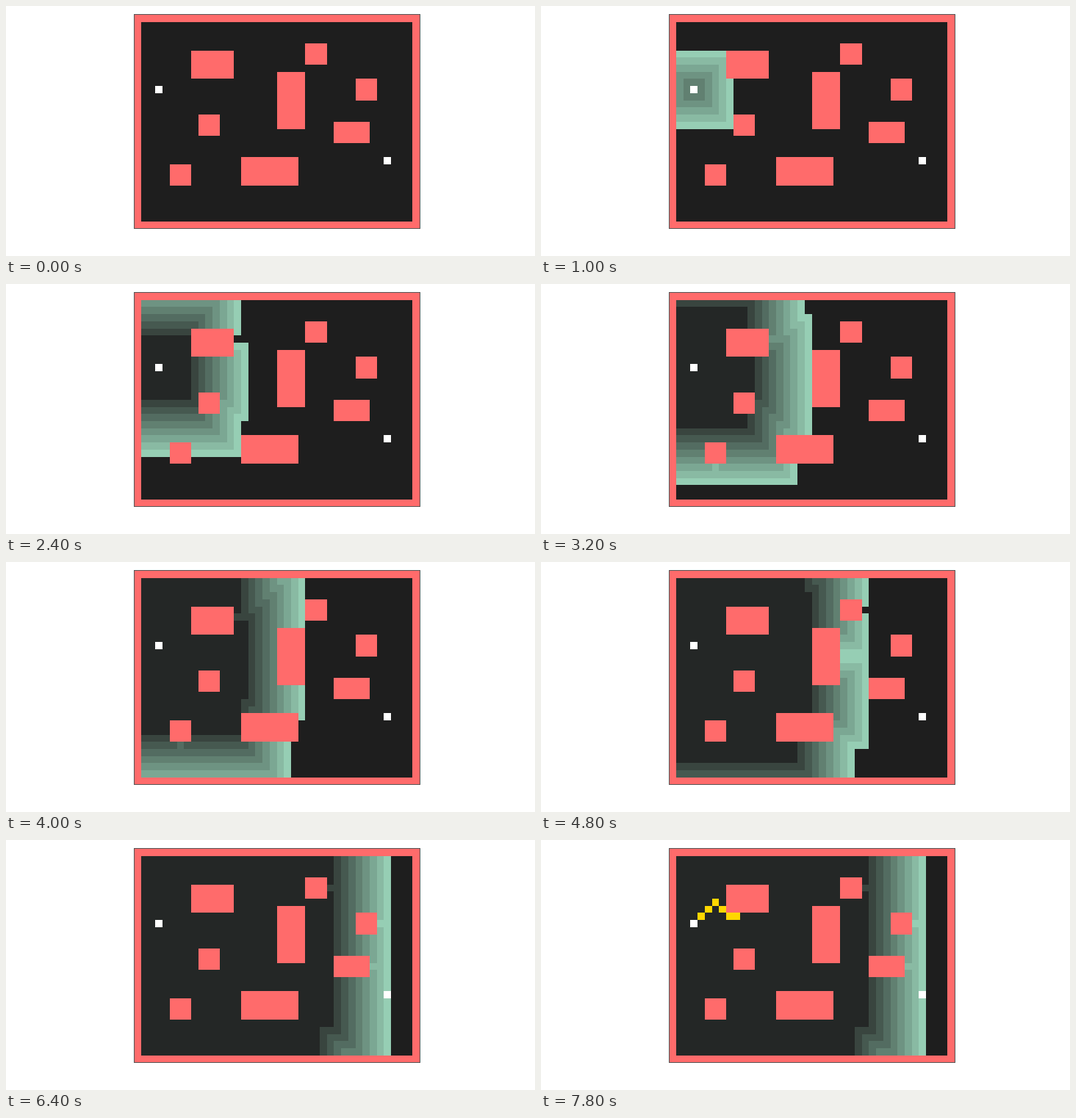
Write an HTML page with a canvas that moves like this. It is 720 by 341 pixels and loops after 8000 ms.

```html
<!DOCTYPE html>
<html lang="en">
<head>
<meta charset="utf-8">
<title>Grid search</title>
<style>
  html, body { margin: 0; width: 100%; height: 100%; overflow: hidden; background: #fff; }
  canvas { display: block; width: 720px; height: 341px; }
</style>
</head>
<body>
<canvas id="stage" width="720" height="341"></canvas>
<script>
const ctx = document.getElementById('stage').getContext('2d');

const COLS = 40, ROWS = 30, CELL = 9.72, LEFT = 174.2, TOP = 12;
const LOOP = 8000, STEP = 200, PATH_AT = 6800;
const START = [3, 10], GOAL = [35, 20];
const FLOOR = [30, 30, 30], WAVE = [150, 206, 180];
const WALL = '#ff6b6b';

// column, row, width, height in cells
const blocks = [
  [0, 0, COLS, 1], [0, ROWS - 1, COLS, 1], [0, 0, 1, ROWS], [COLS - 1, 0, 1, ROWS],
  [8, 5, 6, 4], [24, 4, 3, 3], [20, 8, 4, 8], [31, 9, 3, 3],
  [9, 14, 3, 3], [28, 15, 5, 3], [5, 21, 3, 3], [15, 20, 8, 4]
];
const path = [[4, 9], [5, 8], [6, 7], [7, 8], [8, 9], [9, 9]];

const isWall = (x, y) =>
  blocks.some(([c, r, w, h]) => x >= c && x < c + w && y >= r && y < r + h);

// Breadth-first distances over eight neighbours
function measure() {
  const dist = Array.from({ length: ROWS }, () => Array(COLS).fill(Infinity));
  const queue = [START];
  dist[START[1]][START[0]] = 0;
  for (const [x, y] of queue) {
    for (let dy = -1; dy <= 1; dy++) {
      for (let dx = -1; dx <= 1; dx++) {
        const nx = x + dx, ny = y + dy;
        if (isWall(nx, ny) || dist[ny][nx] < Infinity) continue;
        dist[ny][nx] = dist[y][x] + 1;
        queue.push([nx, ny]);
      }
    }
  }
  return dist;
}

const dist = measure();
const reach = dist[GOAL[1]][GOAL[0]];

function fill(c, r, w, h, color) {
  const x = Math.round(LEFT + c * CELL), y = Math.round(TOP + r * CELL);
  ctx.fillStyle = color;
  ctx.fillRect(x, y,
    Math.round(LEFT + (c + w) * CELL) - x,
    Math.round(TOP + (r + h) * CELL) - y);
}

function shade(age) {
  const a = age < 8 ? 1 - age / 9 : 0.05;
  return `rgb(${FLOOR.map((v, i) => Math.round(v + (WAVE[i] - v) * a))})`;
}

function draw(t) {
  const front = Math.min(Math.floor(t / STEP), reach);
  const steps = Math.max(0, Math.floor((t - PATH_AT) / STEP) + 1);

  ctx.fillStyle = '#fff';
  ctx.fillRect(0, 0, 720, 341);
  fill(0, 0, COLS, ROWS, `rgb(${FLOOR})`);

  dist.forEach((row, y) => row.forEach((d, x) => {
    if (d <= front) fill(x, y, 1, 1, shade(front - d));
  }));
  for (const b of blocks) fill(...b, WALL);
  for (const [x, y] of path.slice(0, steps)) fill(x, y, 1, 1, '#ffd700');
  for (const [x, y] of [START, GOAL]) fill(x, y, 1, 1, '#fff');

  ctx.strokeStyle = '#555';
  ctx.lineWidth = 1;
  ctx.strokeRect(174.5, 11.5, 389, 292);
}

const origin = performance.now();
function tick() {
  draw((performance.now() - origin) % LOOP);
  requestAnimationFrame(tick);
}
tick();
</script>
</body>
</html>
```
